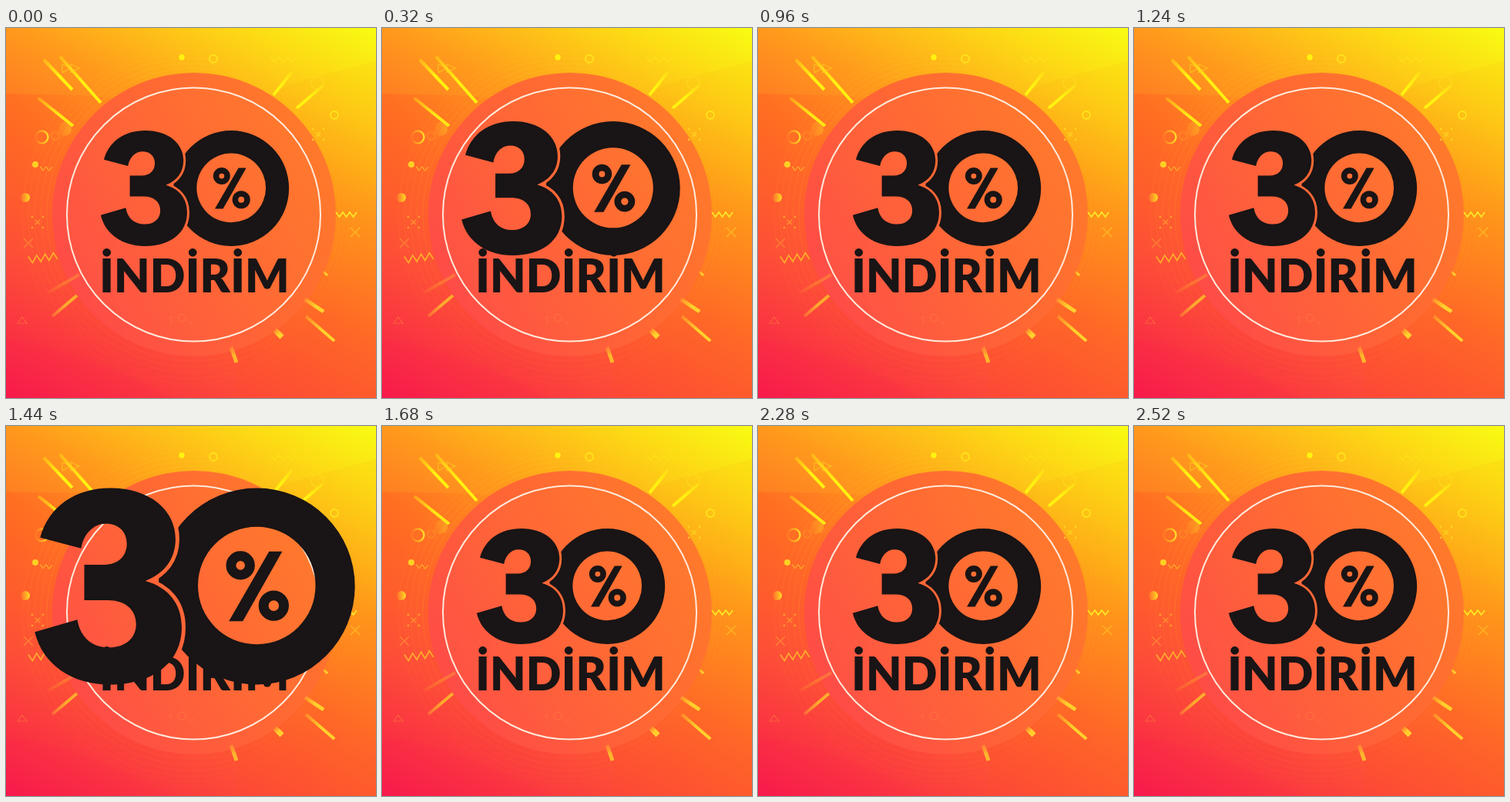
Animation, 480 px wide and 480 px high, one loop 2.56 s. Source, as an HTML page:

```html
<!DOCTYPE html>
<html lang="tr">
<head>
<meta charset="utf-8">
<title>30% İndirim</title>
<style>
html, body { margin: 0; width: 100%; height: 100%; overflow: hidden; background: #ff7a2a; }
svg { display: block; width: 100vw; height: 100vh; }
text { font: 900 60px Lato, "Open Sans", sans-serif; letter-spacing: .2px; }
</style>
</head>
<body>
<svg viewBox="0 0 480 480">
  <defs>
    <linearGradient id="sky" gradientUnits="userSpaceOnUse" x1="480" y1="0" x2="172" y2="572">
      <stop offset="0" stop-color="#f8fc12"/>
      <stop offset=".14" stop-color="#fdd715"/>
      <stop offset=".34" stop-color="#ff9a1c"/>
      <stop offset=".55" stop-color="#ff6c28"/>
      <stop offset=".76" stop-color="#fd4b38"/>
      <stop offset="1" stop-color="#f71b4b"/>
    </linearGradient>
    <linearGradient id="plate" gradientUnits="userSpaceOnUse" x1="80" y1="320" x2="410" y2="130">
      <stop offset="0" stop-color="#fe4c47"/>
      <stop offset=".5" stop-color="#ff6634"/>
      <stop offset="1" stop-color="#ff7b2a"/>
    </linearGradient>
    <radialGradient id="shade" gradientUnits="userSpaceOnUse" cx="0" cy="100" r="190">
      <stop offset="0" stop-color="#ff4a1c" stop-opacity=".28"/>
      <stop offset="1" stop-color="#ff4a1c" stop-opacity="0"/>
    </radialGradient>
    <linearGradient id="ball">
      <stop offset="0" stop-color="#ffd820" stop-opacity=".1"/>
      <stop offset="1" stop-color="#ffdc28"/>
    </linearGradient>
    <linearGradient id="orbit" x1="0" y1="0" x2="0" y2="1">
      <stop offset="0" stop-color="#ffd81c"/>
      <stop offset="1" stop-color="#ff9a30" stop-opacity=".5"/>
    </linearGradient>
    <path id="three" d="M45 145C56 105 90 81 136 81C186 81 220 109 220 147C220 173 205 192 181 201C210 209 228 230 228 261C228 307 190 335 135 335C86 335 48 309 38 267L93 251C97 274 112 287 134 287C155 287 169 275 169 257C169 238 155 226 132 226H102V180H128C146 180 157 169 157 153C157 137 146 127 130 127C114 127 101 140 98 159Z"/>
    <mask id="gap" maskUnits="userSpaceOnUse" x="0" y="0" width="480" height="480">
      <rect width="480" height="480" fill="#fff"/>
      <use href="#three" fill="#000" stroke="#000" stroke-width="10"/>
    </mask>
  </defs>

  <rect width="480" height="480" fill="url(#sky)"/>
  <path d="M0 85C50 88 100 84 150 92V300H0Z" fill="url(#shade)"/>
  <g opacity=".04">
    <path d="M480 42C420 62 360 66 300 110V480H480Z" fill="#f40"/>
    <path d="M0 405C70 408 130 440 220 480H0Z" fill="#f06"/>
    <path d="M480 220C450 300 440 340 380 400S420 470 480 440Z" fill="#f30"/>
  </g>

  <g id="orbits" fill="none" stroke="url(#orbit)"></g>
  <circle cx="244" cy="242" r="184" fill="url(#plate)"/>
  <circle cx="243.5" cy="242" r="164.5" fill="#ff8340" fill-opacity=".1" stroke="#ffeadb" stroke-width="2"/>
  <g id="decor" fill="none"></g>

  <g fill="#191415">
    <text x="244.5" y="343" text-anchor="middle">İNDİRİM</text>
    <g id="sale">
      <use href="#three"/>
      <path mask="url(#gap)" fill-rule="evenodd" d="M198 208a127 127 0 1 0 254 0a127 127 0 1 0-254 0ZM249 207a76 76 0 1 0 152 0a76 76 0 1 0-152 0Z"/>
      <path d="M341 163H358L307 253H289Z"/>
      <g fill="none" stroke="#191415" stroke-width="12.8">
        <circle cx="304" cy="181" r="12.2"/>
        <circle cx="347" cy="233" r="13.2"/>
      </g>
    </g>
  </g>
</svg>
<script>
const NS = "http://www.w3.org/2000/svg";
const decor = document.getElementById("decor");
const orbits = document.getElementById("orbits");
const sale = document.getElementById("sale");

function add(parent, tag, attrs) {
  const el = document.createElementNS(NS, tag);
  for (const key in attrs) el.setAttribute(key, attrs[key]);
  parent.appendChild(el);
  return el;
}

// A streak fades in from its first end to its second.
let streaks = 0;
function streak(x1, y1, x2, y2, width, color, alpha = 1) {
  const id = "streak" + streaks++;
  const ends = { x1, y1, x2, y2 };
  const grad = add(decor, "linearGradient", { id, gradientUnits: "userSpaceOnUse", ...ends });
  add(grad, "stop", { offset: 0, "stop-color": color, "stop-opacity": 0.35 * alpha });
  add(grad, "stop", { offset: 0.55, "stop-color": color, "stop-opacity": alpha });
  add(decor, "line", { ...ends, stroke: `url(#${id})`, "stroke-width": width });
}
function ring(cx, cy, r, width, color, opacity = 1) {
  add(decor, "circle", { cx, cy, r, stroke: color, "stroke-width": width, opacity });
}
function dot(cx, cy, r, fill, opacity = 1) {
  add(decor, "circle", { cx, cy, r, fill, opacity });
}
function line(d, width, color, opacity = 1) {
  add(decor, "path", { d, stroke: color, "stroke-width": width, opacity });
}
function zigzag(x, y, step, height, count, tilt, width, color, opacity) {
  let d = "";
  for (let i = 0; i <= count; i++) {
    d += `${i ? "L" : "M"}${x + i * step} ${y + i * tilt + (i % 2 ? height : -height) / 2}`;
  }
  line(d, width, color, opacity);
}
function cross(x, y, r, width, color, opacity) {
  line(`M${x - r} ${y - r}L${x + r} ${y + r}M${x + r} ${y - r}L${x - r} ${y + r}`, width, color, opacity);
}

for (let i = 0; i < 5; i++) {
  add(orbits, "circle", { cx: 243 - i, cy: 242 + i * 0.5, r: 190 + i * 7, "stroke-width": 0.8, opacity: 0.26 - i * 0.03 });
}

const lemon = "#fff210", gold = "#ffd02c", amber = "#ffb62c";

streak(49, 41, 86, 80, 4, lemon);
streak(70, 37, 123, 97, 4, lemon);
streak(42, 91, 87, 127, 4, "#ffe814");
streak(371, 57, 347, 87, 4, lemon);
streak(411, 75, 377, 104, 4, lemon);
streak(60, 374, 92, 347, 4, amber, 0.9);
streak(55, 343, 95, 320, 4, amber, 0.35);
streak(388, 352, 412, 368, 5, gold);
streak(389, 374, 426, 406, 4, gold);
streak(349, 392, 358, 401, 7, gold);
streak(292, 414, 299, 434, 5, amber);
streak(412, 316, 417, 321, 3, gold);

dot(228, 38, 3.7, lemon);
ring(269, 40, 5, 1.8, "#ffe21c");
ring(426, 113, 5, 1.8, "#ffe41c");
ring(404, 71, 8, 1.5, "#ffe020", 0.55);
ring(46.5, 141.5, 8, 2.4, "url(#ball)");
ring(64, 140, 5, 1.2, "#ffc026", 0.4);
dot(76, 131, 9, "url(#ball)", 0.4);
dot(38, 177, 4, "#ffd224");
dot(25, 220, 6, "url(#ball)");

zigzag(343, 41, 5.5, 6, 7, 0, 1.5, "#ffe51c", 0.65);
zigzag(428, 242, 4.5, 6, 6, 0, 1.8, "#ffe626", 1);
zigzag(29, 301, 5.4, 9, 7, -0.8, 1.7, "#ffbd2c", 0.85);
zigzag(44, 182, 4, 5, 4, 0.2, 1.4, "#ffc428", 0.65);

cross(453, 265, 6, 1.7, "#ffc428", 0.65);
cross(29, 279, 6, 1.7, "#ff9c36", 0.55);
for (const [x, y, color] of [[405, 138, "#ffe02a"], [41, 252, "#ffb52e"]]) {
  cross(x, y, 3, 1.4, color, 0.65);
  for (const dx of [-7, 7]) for (const dy of [-7, 7]) dot(x + dx, y + dy, 1.4, color, 0.7);
}

line("M73 47L84 52L73 58ZM84 47L95 52L84 58Z", 1.2, "#ffda20", 0.6);
line("M15 383L21 375L27 383Z", 1.2, "#ff8a3a", 0.5);
ring(228, 376, 5, 1, "#ff9a42", 0.35);
line("M208 379L215 374L214 383M238 384L244 378", 1, "#ff9a42", 0.3);

const PERIOD = 1280, HALF = 200, GROWTH = 0.715, DRAWN = 1.695;

function ease(t) {
  return t < 0.5 ? 0.5 * (2 * t) ** 3.4 : 1 - 0.5 * (2 - 2 * t) ** 3.4;
}
function render(ms) {
  const t = ms % PERIOD;
  const pulse = Math.max(0, 1 - Math.abs(t - HALF) / HALF);
  const scale = (1 + GROWTH * ease(pulse)) / DRAWN;
  sale.setAttribute("transform", `translate(245 208) scale(${scale}) translate(-245 -208)`);
}

const start = performance.now();
function tick() {
  render(performance.now() - start);
  requestAnimationFrame(tick);
}
render(0);
requestAnimationFrame(tick);
</script>
</body>
</html>
```
